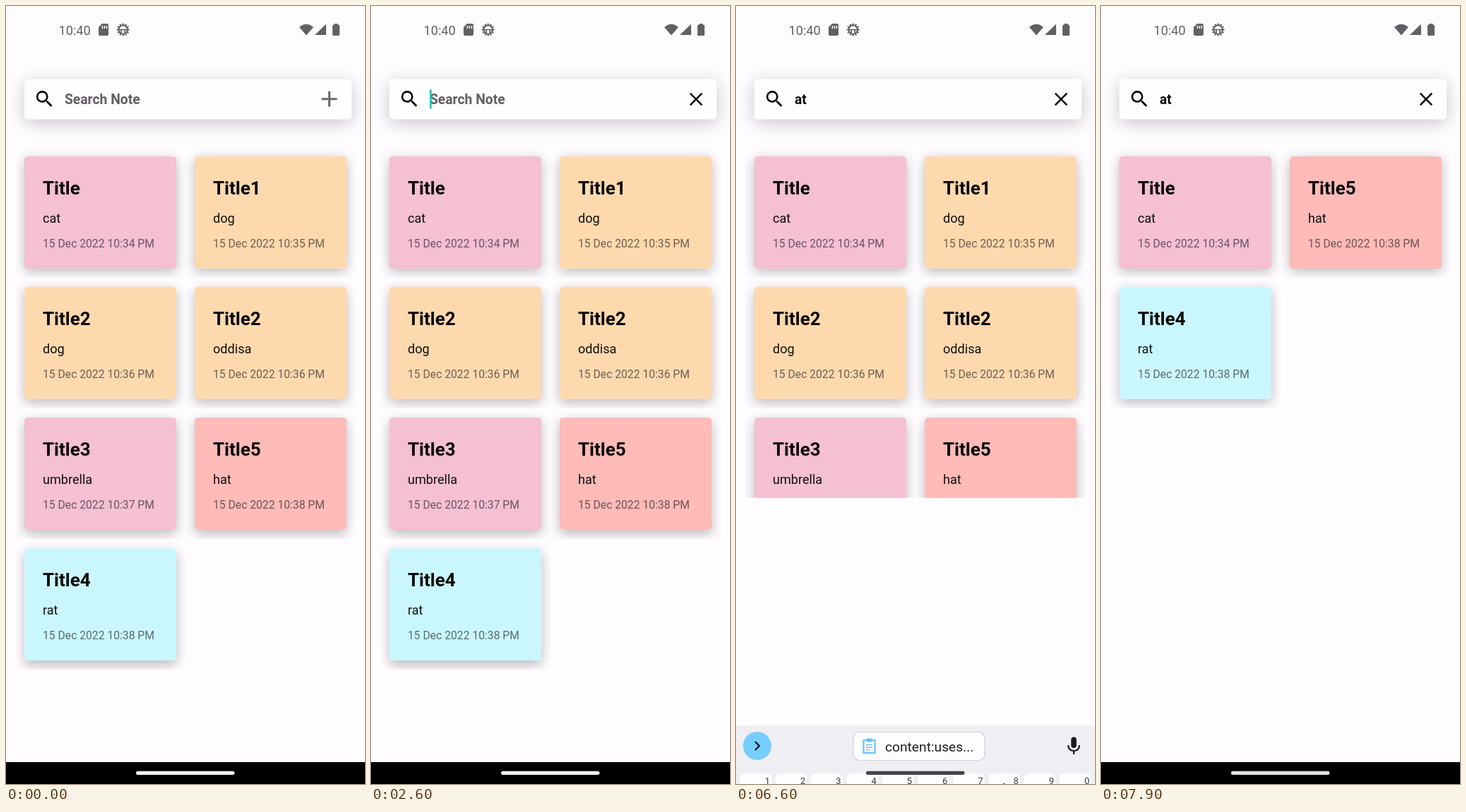
Animation of 508 by 1102 pixels, one loop 8000 ms. Source, as an HTML page with a canvas:

```html
<!DOCTYPE html>
<html lang="en">
<head>
<meta charset="utf-8">
<title>Note search</title>
<style>
  html, body { margin: 0; width: 508px; height: 1102px; overflow: hidden; background: #fefcff; }
  canvas { display: block; width: 508px; height: 1102px; }
</style>
</head>
<body>
<canvas id="stage"></canvas>
<script>
const W = 508, H = 1102, LOOP = 8000, STEP = 100;
const canvas = document.getElementById('stage');
const c = canvas.getContext('2d');
const dpr = window.devicePixelRatio || 1;
canvas.width = W * dpr;
canvas.height = H * dpr;

const BG = '#fefcff', GREY = '#636065', INK = '#1b1b1d', KEY = '#fdfcff';
const BLUE = '#76ceff', SOFT = '#d0e2f2';
const PINK = '#f5bfd4', ORANGE = '#ffd9ae', RED = '#febbb7', CYAN = '#caf7fe';

const CARD_W = 215, CARD_H = 159, TOP = 213, ROW = 185;
const COLS = [26, 267];
const notes = [
  ['Title', 'cat', '10:34', PINK],
  ['Title1', 'dog', '10:35', ORANGE],
  ['Title2', 'dog', '10:36', ORANGE],
  ['Title2', 'oddisa', '10:36', ORANGE],
  ['Title3', 'umbrella', '10:37', PINK],
  ['Title5', 'hat', '10:38', RED],
  ['Title4', 'rat', '10:38', CYAN]
];

const SEARCH = new Path2D('M15.5 14h-.79l-.28-.27A6.47 6.47 0 0 0 16 9.5 6.5 6.5 0 1 0 9.5 16c1.61 0 3.09-.59 4.23-1.57l.27.28v.79l5 4.99L20.49 19l-4.99-5zm-6 0a4.5 4.5 0 1 1 0-9 4.5 4.5 0 0 1 0 9z');

const clamp = v => Math.max(0, Math.min(1, v));
const mix = (a, b, k) => a + (b - a) * clamp(k);
const ease = k => 0.5 - 0.5 * Math.cos(Math.PI * clamp(k));
const within = (t, a, b) => t >= a && t < b;

function box(x, y, w, h, r, fill) {
  c.beginPath();
  c.roundRect(x, y, w, h, r);
  c.fillStyle = fill;
  c.fill();
}

function disc(x, y, r, fill) {
  c.beginPath();
  c.arc(x, y, r, 0, Math.PI * 2);
  c.fillStyle = fill;
  c.fill();
}

function text(s, x, y, size, color, weight = 400, align = 'left') {
  c.font = `${weight} ${size}px Roboto, sans-serif`;
  c.fillStyle = color;
  c.textAlign = align;
  c.fillText(s, x, y);
}

function line(d, color, width, cap = 'butt') {
  c.strokeStyle = color;
  c.lineWidth = width;
  c.lineCap = cap;
  c.stroke(new Path2D(d));
}

function shape(d, color) {
  c.fillStyle = color;
  c.fill(new Path2D(d));
}

function icon(path, x, y, scale, color) {
  c.save();
  c.translate(x, y);
  c.scale(scale, scale);
  c.fillStyle = color;
  c.fill(path);
  c.restore();
}

function shadow(alpha, blur, dy) {
  c.shadowColor = `rgba(0,0,0,${alpha})`;
  c.shadowBlur = blur * dpr;
  c.shadowOffsetY = dy * dpr;
}

function statusBar() {
  text('10:40', 74.5, 40.5, 18.2, GREY);
  shape('M136 25H143Q145 25 145 27V40Q145 42 143 42H133Q131 42 131 40V30Z', GREY);
  line('M136.5 28V32M139.5 28V32M142.5 28V32', BG, 1.4);

  c.save();
  c.translate(165.7, 33.5);
  c.strokeStyle = GREY;
  c.lineWidth = 2;
  c.beginPath();
  c.arc(0, 0, 6.2, 0, Math.PI * 2);
  c.stroke();
  for (let i = 0; i < 12; i++) {
    c.rotate(Math.PI / 6);
    box(-1.1, -8.9, 2.2, 2.6, 0, GREY);
  }
  line('M-6 0H6M-2.5 0V5.5M2.5 0V5.5', GREY, 1.7);
  c.restore();

  shape('M415 30Q425 21.5 435 30L425 41.5Z', GREY);
  shape('M453 25.5V41H437Z', GREY);
  box(462, 26.5, 10, 15.5, 1.5, GREY);
  box(464.5, 25, 5, 3, 0.5, GREY);
}

function searchBar(t) {
  const open = t >= 2300;
  const query = t >= 3700 ? 'at' : t >= 3400 ? 'a' : '';
  c.save();
  shadow(0.22, 25, 5);
  box(26, 103.5, 463, 57, 5, '#fffeff');
  c.restore();
  icon(SEARCH, 39, 116.2, 1.29, '#050505');

  if (open) line('M451.7 123.7L468.3 140.3M468.3 123.7L451.7 140.3', '#080808', 2.6);
  else line('M446.5 131.7H468.5M457.5 120.7V142.7', '#6b696c', 3);

  text(query || 'Search Note', 83, 139, 19.3, query ? '#0c0c0c' : '#615f62', 700);
  const end = query ? 83 + c.measureText(query).width : 83;
  if (query && t < 6500) box(83, 141.3, end - 83, 1.6, 0, '#0c0c0c');

  const caret = within(t, 2300, 2800) || within(t, 3200, 4200) ||
    within(t, 4700, 5200) || within(t, 5700, 6200);
  if (caret) box(query ? end + 0.2 : end, 118.5, 2.8, 27, 0, '#17cdbd');
}

function card([title, body, time, color], x, y, alpha = 1) {
  if (alpha <= 0) return;
  c.save();
  c.globalAlpha = alpha;
  c.save();
  c.beginPath();
  c.rect(x - 13, y - 13, 241, CARD_H + 26);
  c.clip();
  shadow(0.27, 17, 3 + y / 230);
  box(x, y, CARD_W, CARD_H, 5, color);
  c.restore();
  text(title, x + 26, y + 53.5, 26, '#050505', 700);
  text(body, x + 26, y + 93.7, 18.1, '#101010');
  text(`15 Dec 2022 ${time} PM`, x + 26, y + 128.8, 15.7, 'rgba(20,20,25,.62)');
  c.restore();
}

function cards(t) {
  c.save();
  if (within(t, 3100, 6700)) {
    c.beginPath();
    c.rect(0, 180, W, 516.5);
    c.clip();
  }
  const slot = i => [COLS[i % 2], TOP + ROW * Math.floor(i / 2)];
  if (t < 6700) {
    notes.forEach((n, i) => {
      if (i < 6 || t < 3100) card(n, ...slot(i));
    });
  } else {
    // Unmatched notes fade, then the rest close the gap.
    for (let i = 1; i < 5; i++) card(notes[i], ...slot(i), 0.55 - (t - 6700) / 150);
    const move = t < 7200 ? Math.min(t, 7000) : t;
    card(notes[0], ...slot(0));
    card(notes[5], COLS[1], mix(583, TOP, ease((move - 6817) / 250)));
    card(notes[6], COLS[0], TOP + ROW, clamp((t - 7100) / 200));
  }
  c.restore();
}

function letters(row, left, y, pressed, hints) {
  [...row].forEach((ch, i) => {
    const x = left + i * 50.25;
    box(x, y, 44.5, 53, 6, ch === pressed ? '#d9d9de' : KEY);
    text(ch, x + 22.2, y + 34.5, 29, INK, 400, 'center');
    if (hints) text(String((i + 1) % 10), x + 38.6, y + 14.5, 13, '#3a3a3d', 400, 'center');
  });
}

function toolbar() {
  disc(30, 738, 20, BLUE);
  line('M27 732L33 738L27 744', INK, 2.3);
  box(166, 718.5, 186, 40, 9, KEY);
  c.strokeStyle = '#cfced4';
  c.lineWidth = 1.2;
  c.stroke();
  line('M180.5 730H196.5V748H180.5Z', '#67c4f6', 2.2);
  box(184.5, 727.5, 8, 5, 1, '#67c4f6');
  line('M184 736.5H193M184 740H193M184 743.5H190', '#67c4f6', 1.6);
  text('content:uses...', 211, 746, 19.2, '#202022');
  box(474.2, 725.5, 7.6, 15.5, 3.8, INK);
  line('M470 737Q470.5 745 478 745Q485.500 745 486 737M478 745V750', INK, 2.2);
}

function keyboard(t) {
  const off = t < 3200 ? 165 : t < 6500 ? 0 : t < 6600 ? 110 : 310;
  const pressed = within(t, 3400, 3500) ? 'a' : within(t, 3700, 3800) ? 't' : '';
  c.save();
  c.translate(0, off);
  box(0, 709.5, W, 393, 0, '#efeef2');
  toolbar();
  letters('qwertyuiop', 5.7, 777, pressed, true);
  letters('asdfghjkl', 30.800, 842, pressed);
  letters('zxcvbnm', 81, 907.5, pressed);

  box(5.7, 907.5, 69.5, 53, 6, SOFT);
  line('M40 921.5L52 934.5H46V946.5H34V934.5H28Z', INK, 2.3);
  box(432.5, 907.5, 69.5, 53, 6, SOFT);
  line('M460 923.500H482V946.5H460L452 935Z', INK, 2.4);
  line('M464.5 930L474.5 940M474.5 930L464.5 940', INK, 2.4);

  box(5.7, 973, 69.5, 54, 27, '#b5c7d4');
  text('?123', 40.2, 1007.5, 18.5, INK, 400, 'center');
  box(81, 973, 44.500, 54, 6, SOFT);
  text(',', 103, 1010, 26, INK, 400, 'center');
  box(131.200, 973, 44.5, 54, 6, KEY);
  c.beginPath();
  c.arc(153, 999.5, 11.6, 0, Math.PI * 2);
  c.strokeStyle = INK;
  c.lineWidth = 2.3;
  c.stroke();
  disc(148.8, 996.5, 1.9, INK);
  disc(157.2, 996.5, 1.9, INK);
  line('M147 1002.5Q153 1009 159 1002.5', INK, 2.2);
  box(181, 973, 195.5, 54, 6, KEY);
  box(382.200, 973, 44.5, 54, 6, SOFT);
  text('.', 404, 1010, 26, INK, 400, 'center');
  box(432.5, 973, 69.5, 54, 27, within(t, 6400, 6600) ? '#69b9e6' : BLUE);
  icon(SEARCH, 452, 984.300, 1.27, INK);

  line('M73.5 1067.5L79.500 1073.5L85.5 1067.5', '#5d5c60', 1.8);
  for (let i = 0; i < 7; i++) {
    for (let j = 0; j < 3; j++) box(419.5 + i * 2.9, 1065.5 + j * 3.2, 1.9, 1.9, 0, '#68676b');
  }
  box(424, 1075.2, 11, 1.9, 0, '#68676b');
  c.restore();
}

function navPill(t) {
  const level = t < 6500 ? mix(242, 64, (t - 3400) / 1400) : mix(68, 226, (t - 7000) / 900);
  const v = Math.round(level);
  box(184, 1083.7, 139.5, 5.2, 2.6, `rgb(${v},${v},${v})`);
}

function draw(t) {
  c.setTransform(dpr, 0, 0, dpr, 0, 0);
  box(0, 0, W, H, 0, BG);
  statusBar();
  searchBar(t);
  cards(t);
  box(0, 1071, W, 31, 0, '#000');
  if (within(t, 3100, 6700)) keyboard(t);
  navPill(t);
}

const start = performance.now();
function tick() {
  const t = (performance.now() - start) % LOOP;
  draw(Math.floor(t / STEP) * STEP);
  requestAnimationFrame(tick);
}
tick();
</script>
</body>
</html>
```
